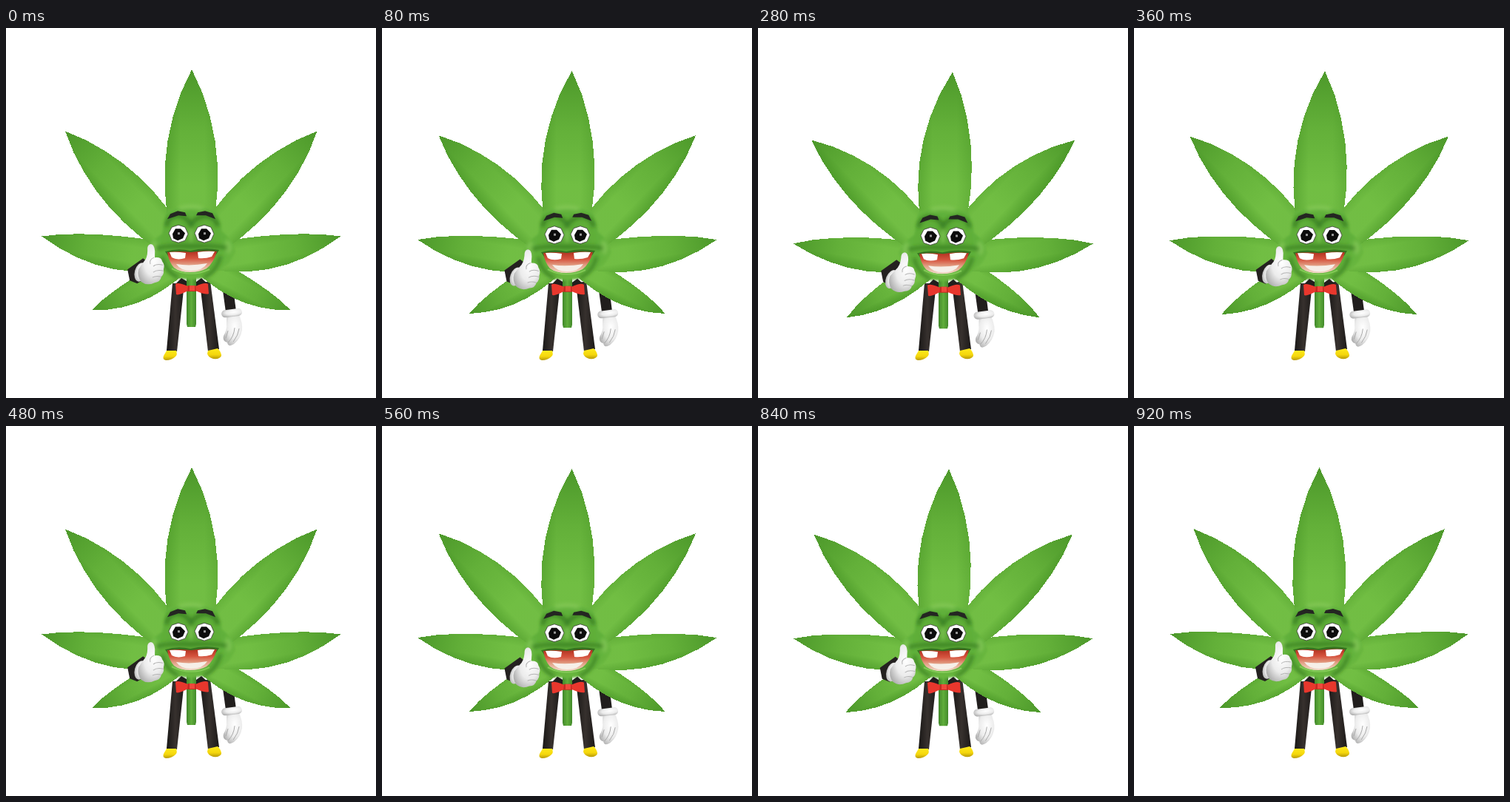
Animation, 500 px wide and 500 px high, one loop 960 ms. Source, as an HTML page:

```html
<!DOCTYPE html>
<html lang="en">
<head>
<meta charset="utf-8">
<title>Thumbs-up leaf</title>
<style>
html, body { margin: 0; width: 100%; height: 100%; overflow: hidden; background: #fff; }
svg { display: block; width: 100vw; height: 100vh; }
</style>
</head>
<body>
<svg viewBox="0 0 500 500">
  <defs>
    <filter id="soft" x="-50%" y="-50%" width="200%" height="200%"><feGaussianBlur stdDeviation="2.5"/></filter>
    <filter id="haze" x="-50%" y="-50%" width="200%" height="200%"><feGaussianBlur stdDeviation="1.5"/></filter>
    <radialGradient id="skin" cx=".5" cy=".45" r=".6">
      <stop offset="0" stop-color="#56a432"/><stop offset=".6" stop-color="#60b03a"/><stop offset="1" stop-color="#6bb940"/>
    </radialGradient>
    <linearGradient id="gum" x1="0" y1="0" x2="0" y2="1">
      <stop offset="0" stop-color="#b0301f"/><stop offset=".35" stop-color="#d6543f"/><stop offset=".65" stop-color="#e2a186"/><stop offset="1" stop-color="#f1dccb"/>
    </linearGradient>
    <radialGradient id="glove" cx=".6" cy=".4" r=".7">
      <stop offset="0" stop-color="#fff"/><stop offset=".55" stop-color="#ececec"/><stop offset="1" stop-color="#adadad"/>
    </radialGradient>
    <linearGradient id="trouser">
      <stop offset="0" stop-color="#191716"/><stop offset=".5" stop-color="#37312e"/><stop offset="1" stop-color="#1c1918"/>
    </linearGradient>
    <linearGradient id="shoe" x1="0" y1="0" x2="0" y2="1">
      <stop offset="0" stop-color="#ffea1c"/><stop offset=".6" stop-color="#f4d60c"/><stop offset="1" stop-color="#b89a08"/>
    </linearGradient>
    <linearGradient id="stalk">
      <stop offset="0" stop-color="#41882a"/><stop offset=".5" stop-color="#60ae3b"/><stop offset="1" stop-color="#438a2b"/>
    </linearGradient>
    <g id="eye">
      <path fill="#fff" stroke="#3a3a36" stroke-width=".8" d="M-13-1L-9-9 0-12 9-9 13 0 9 9 0 12-9 9Z"/>
      <path fill="#0c0c0c" d="M-8 0L-4-7 3-7 9-1 6 6-1 9-7 6Z"/>
      <path fill="#999" d="M-1-2h3v3h-3z"/>
    </g>
  </defs>

  <g id="legs">
    <path fill="url(#trouser)" d="M225 345H241L231 437 217 436Z"/>
    <path fill="url(#trouser)" d="M262 345L276 342 288 434 273 437Z"/>
    <path fill="url(#shoe)" d="M217 436L230 436Q232 441 229 444 224 449 216 449 211 448 213 443Z"/>
    <path fill="url(#shoe)" d="M273 436L286 433Q291 438 291 443 289 448 280 447 273 445 272 440Z"/>
  </g>

  <g id="arm">
    <path fill="#211e1d" d="M293 355L308 360 311 383 297 384Z"/>
    <path fill="url(#glove)" d="M298 388L314 386Q320 398 319 408 317 420 308 427 300 432 299 425 292 423 294 416 299 408 298 400Z"/>
    <path fill="none" stroke="#aaa" d="M309 405Q308 417 300 425M315 406Q314 415 307 424M300 409L297 419"/>
    <rect x="291" y="380" width="28" height="10" rx="5" fill="url(#glove)" transform="rotate(-7 305 385)"/>
  </g>

  <path id="stem" fill="url(#stalk)" d="M244 325H257V400L256 404H245L244 400Z"/>
  <g id="leaves" shape-rendering="crispEdges"></g>

  <g id="head">
    <path fill="url(#skin)" filter="url(#haze)" d="M217 246Q250 239 284 246 290 262 292 275 308 287 310 302 303 322 284 329 272 340 249 340 226 340 215 329 195 320 190 303 195 288 211 278 212 258Z"/>
    <g filter="url(#soft)" fill="none">
      <path stroke="#2f7219" stroke-width="6" opacity=".7" d="M217 268Q219 252 236 254 246 257 250 266 256 256 268 254 283 254 286 268"/>
      <path stroke="#2f7219" stroke-width="5" opacity=".65" d="M203 298Q220 293 249 295 280 293 299 297M211 309Q216 330 233 337M290 308Q284 330 267 337"/>
      <path stroke="#8acb5c" stroke-width="5" opacity=".75" d="M203 289Q195 295 201 304M297 288Q306 295 299 304M250 272V288M234 244Q250 239 266 244"/>
    </g>
  </g>

  <g id="mouth">
    <path fill="#2d651c" opacity=".8" d="M215 302Q232 297 249 301 268 296 288 300 285 306 281 309L221 311Z"/>
    <path fill="url(#gum)" d="M218 303Q234 301 250 303 268 300 285 302 281 317 271 325 262 330 249 330 235 330 227 324 220 316 218 303Z"/>
    <path fill="#f6efe8" d="M230 319Q249 322 272 318 266 328 250 328 236 328 230 319Z"/>
    <path fill="#fff" d="M221 303Q231 302 243 304L242 311Q231 314 224 310ZM259 303Q271 301 282 302L278 309Q269 312 260 311Z"/>
    <path fill="none" stroke="#8bd05e" stroke-width="2" opacity=".8" d="M224 325Q249 338 275 326"/>
  </g>

  <g id="eyes">
    <use href="#eye" x="233" y="278"/>
    <use href="#eye" x="268" y="278"/>
  </g>
  <g id="brows" fill="#242522">
    <path d="M218 258L222 251 232 247 242 249 244 254 233 253Z"/>
    <path d="M257 253L259 249 269 247 279 250 283 258 270 253Z"/>
  </g>

  <g id="bow">
    <path fill="#211e1d" d="M229 346L237 338 244 342V349ZM257 343L264 338 273 346 257 350Z"/>
    <path fill="#e8372d" d="M229 346Q232 343 246 349H256Q269 343 273 346L274 359Q270 361 256 355H246Q233 362 230 360Z"/>
    <path fill="#c42a22" d="M246 348H256L257 356H245Z"/>
    <path fill="#f0483b" d="M248 348H255V355H248Z"/>
  </g>

  <path id="sleeve" fill="#242120" d="M164 326L185 311 194 318 189 338 177 345 167 341Z"/>
  <g id="hand">
    <ellipse cx="182" cy="329" rx="8" ry="13" fill="url(#glove)" transform="rotate(15 182 329)"/>
    <path fill="url(#glove)" d="M186 315Q191 310 191 300 190 292 195 291 200 291 201 300L201 309Q210 308 211 314 215 319 213 325 214 332 210 335 209 342 201 343 191 348 183 342 177 335 179 325Z"/>
    <path fill="none" stroke="#b4b4b4" d="M200 309Q193 312 195 318M212 319Q203 317 199 321M213 327Q204 325 199 329M210 335Q203 333 198 336"/>
  </g>
</svg>
<script>
const $ = id => document.getElementById(id);
const CYCLE = 480, STEP = 40, LEAD = 40;

// Each leaf: base, raised tip, tip travel, half width, sag; side leaves are mirrored about x = 250
const shapes = [
  { base: [240, 316], tip: [115.5, 381], travel: [5, 12], width: 17.5, sag: 5 },
  { base: [225, 310], tip: [48.5, 281], travel: [-1, 12], width: 23, sag: 6 },
  { base: [220, 284], tip: [80.5, 139], travel: [-9.5, 14.5], width: 29, sag: 0 },
  { base: [250, 281], tip: [250.5, 56], travel: [14.5, 4], width: 36, sag: 0, single: true }
];
const leaves = shapes.flatMap(s => s.single ? [s] : [s, { ...s, mirror: true }]);

function add(parent, tag, attrs) {
  const el = document.createElementNS('http://www.w3.org/2000/svg', tag);
  for (const k in attrs) el.setAttribute(k, attrs[k]);
  return parent.appendChild(el);
}

function gradient(id, x1, y1, x2, y2, stops) {
  const g = add(document.querySelector('defs'), 'linearGradient',
    { id, x1, y1, x2, y2, gradientUnits: 'userSpaceOnUse' });
  for (const [offset, color, alpha] of stops)
    add(g, 'stop', { offset, 'stop-color': color, 'stop-opacity': alpha });
  return `url(#${id})`;
}

leaves.forEach((leaf, i) => {
  const { base: [bx, by], tip: [tx, ty], width } = leaf;
  const k = width / Math.hypot(tx - bx, ty - by);
  const nx = (by - ty) * k, ny = (tx - bx) * k;
  const mx = (bx + tx) / 2, my = (by + ty) / 2 + leaf.sag;
  const fills = [
    gradient('along' + i, bx, by, tx, ty,
      [[0, '#72bd45', 1], [.3, '#71be43', 1], [.65, '#63b039', 1], [1, '#4c982a', 1]]),
    gradient('across' + i, mx - nx, my - ny, mx + nx, my + ny,
      [[0, '#2f7d14', .35], [.3, '#2f7d14', 0], [.75, '#2f7d14', 0], [1, '#2f7d14', .2]])
  ];
  const g = add($('leaves'), 'g', leaf.mirror ? { transform: 'translate(500.5 0) scale(-1 1)' } : {});
  leaf.parts = fills.map(fill => add(g, 'polygon', { fill }));
});

// The blade swells as a skewed sine; its tip carries most of the travel
function outline({ base, tip, travel, width, sag }, p) {
  const dx = tip[0] + travel[0] * p - base[0], dy = tip[1] + travel[1] * p - base[1];
  const len = Math.hypot(dx, dy), n = 7, left = [], right = [];
  for (let i = 0; i <= n; i++) {
    const s = i / n, u = 1 - s, bend = p * u ** 1.6;
    const w = width * Math.sin(2.275 * s ** .86) / len;
    const x = base[0] + (tip[0] - base[0]) * u + travel[0] * bend;
    const y = base[1] + (tip[1] - base[1]) * u + travel[1] * bend + sag * Math.sin(Math.PI * s);
    left.push([x - dy * w, y + dx * w]);
    right.unshift([x + dy * w, y - dx * w]);
  }
  return [...left, ...right].join(' ');
}

const swing = v => Math.sin(Math.PI / 2 * v) ** 2;
// Soft start going down, quick snap back up
const bounce = v => v <= 1 ? swing(v ** 1.15) : 1 - (v - 1) ** 1.8;

const move = (id, x, y, turn = '') => $(id).setAttribute('transform', `translate(${x} ${y}) ${turn}`);

function draw(ms) {
  const t = Math.floor(ms / STEP) * STEP;
  const v = (t + LEAD) % CYCLE / CYCLE * 2;
  const p = bounce(v), h = swing(v);
  for (const leaf of leaves) {
    const points = outline(leaf, p);
    leaf.parts.forEach(el => el.setAttribute('points', points));
  }
  move('head', 0, 2 * p);
  move('brows', .5 * p, 6.5 * p);
  move('eyes', 0, 4 * p);
  move('mouth', 0, 2.5 * p);
  move('bow', 0, 2 * p);
  move('stem', 0, 2.5 * p);
  move('arm', .5 * p, 3 * p);
  move('sleeve', 3 * h, 3 * h);
  move('hand', -1.5 * h, 16 * h, `rotate(${9 * h} 194 328)`);
}

const start = performance.now();
function tick() {
  draw(performance.now() - start);
  requestAnimationFrame(tick);
}
tick();
</script>
</body>
</html>
```
